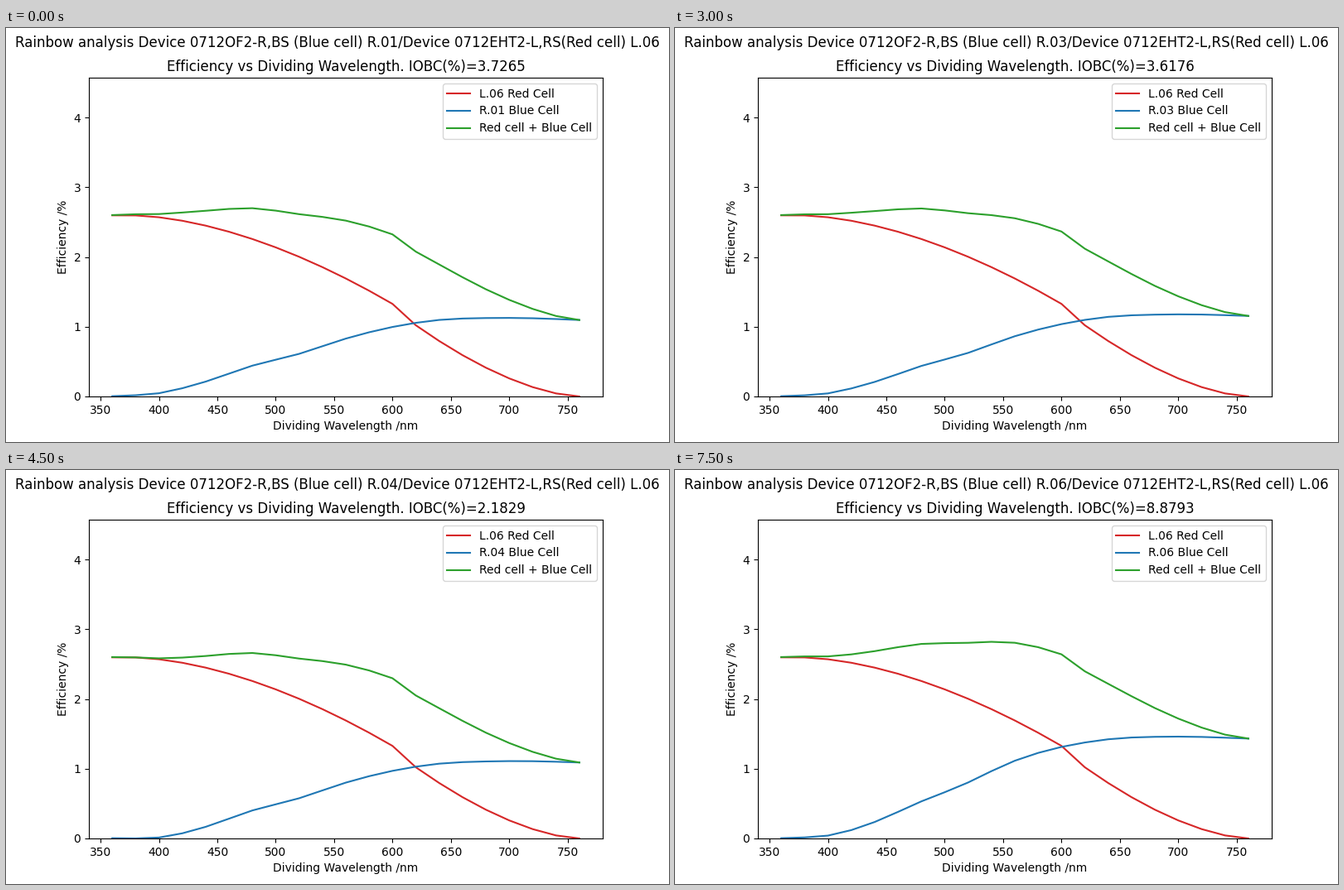
These frames come from a looping animation (800x500 px, 8000 ms). A matplotlib script:

```python
import numpy as np
import matplotlib.pyplot as plt
from matplotlib.animation import FuncAnimation

STEP_MS = 500
HOLD = 3  # steps each blue cell stays on screen
FRAMES = 16

# per blue cell: IOBC and its offset from the base curve at OFFSET_NM[1:]
OFFSET_NM = np.array([360, 420, 480, 560, 640, 760])
CELLS = [
    (3.7265, (0, 0, 0, 0, 0)),
    (4.0310, (.003, .008, .028, .040, .061)),
    (3.6176, (-.003, -.004, .034, .044, .058)),
    (2.1829, (-.044, -.040, -.029, -.025, -.007)),
    (3.3001, (-.026, -.015, .075, .142, .229)),
    (8.8793, (.002, .090, .285, .325, .336)),
]


def smooth(x, xk, yk):
    """Cubic Hermite curve through the key points (xk, yk)."""
    yk = np.asarray(yk, dtype=float)
    slope = np.gradient(yk, xk)
    i = np.clip(np.searchsorted(xk, x, side="right") - 1, 0, len(xk) - 2)
    h = xk[i + 1] - xk[i]
    t = (x - xk[i]) / h
    ease = t * t * (3 - 2 * t)
    bend = h * t * (1 - t) * ((1 - t) * slope[i] - t * slope[i + 1])
    return yk[i] + (yk[i + 1] - yk[i]) * ease + bend


def red_cell(x):
    """Two power laws that meet with a kink between 600 and 620 nm."""
    upper = 2.598 - 1.27 * (np.maximum(x - 376, 0) / 224) ** 1.72
    lower = 1.021 * ((760 - x) / 140) ** 1.62
    return np.where(x <= 600, upper, lower)


def blue_cell(x, offset):
    base = smooth(x, np.arange(360, 761, 40),
                  [.004, .046, .213, .442, .611, .830,
                   .997, 1.098, 1.125, 1.122, 1.097])
    return np.maximum(base + smooth(x, OFFSET_NM, (0, *offset)), 0)


wavelength = np.arange(360, 761, 20)
red = red_cell(wavelength)
blues = [blue_cell(wavelength, offset) for _, offset in CELLS]

fig, ax = plt.subplots(figsize=(8, 5), dpi=100)
heading = fig.suptitle("", y=0.982)
title = ax.set_title("")
ax.plot(wavelength, red, color="tab:red", label="L.06 Red Cell")
blue_line, = ax.plot(wavelength, blues[0], color="tab:blue", label="R.01 Blue Cell")
sum_line, = ax.plot(wavelength, red + blues[0], color="tab:green",
                    label="Red cell + Blue Cell")
ax.set_xlim(340, 780)
ax.set_ylim(0, 4.573)
ax.set_yticks(range(5))
ax.set_xlabel("Dividing Wavelength /nm")
ax.set_ylabel("Efficiency /%")
legend = ax.legend(loc="upper right")


def update(frame):
    i = frame // HOLD
    cell = f"R.{i + 1:02d}"
    heading.set_text(f"Rainbow analysis Device 0712OF2-R,BS (Blue cell) {cell}"
                     "/Device 0712EHT2-L,RS(Red cell) L.06")
    title.set_text(f"Efficiency vs Dividing Wavelength. IOBC(%)={CELLS[i][0]:.4f}")
    legend.get_texts()[1].set_text(f"{cell} Blue Cell")
    blue_line.set_ydata(blues[i])
    sum_line.set_ydata(red + blues[i])
    return heading, title, legend, blue_line, sum_line


anim = FuncAnimation(fig, update, frames=FRAMES, interval=STEP_MS,
                     init_func=lambda: update(0), repeat=True, repeat_delay=0)
plt.show()
```
